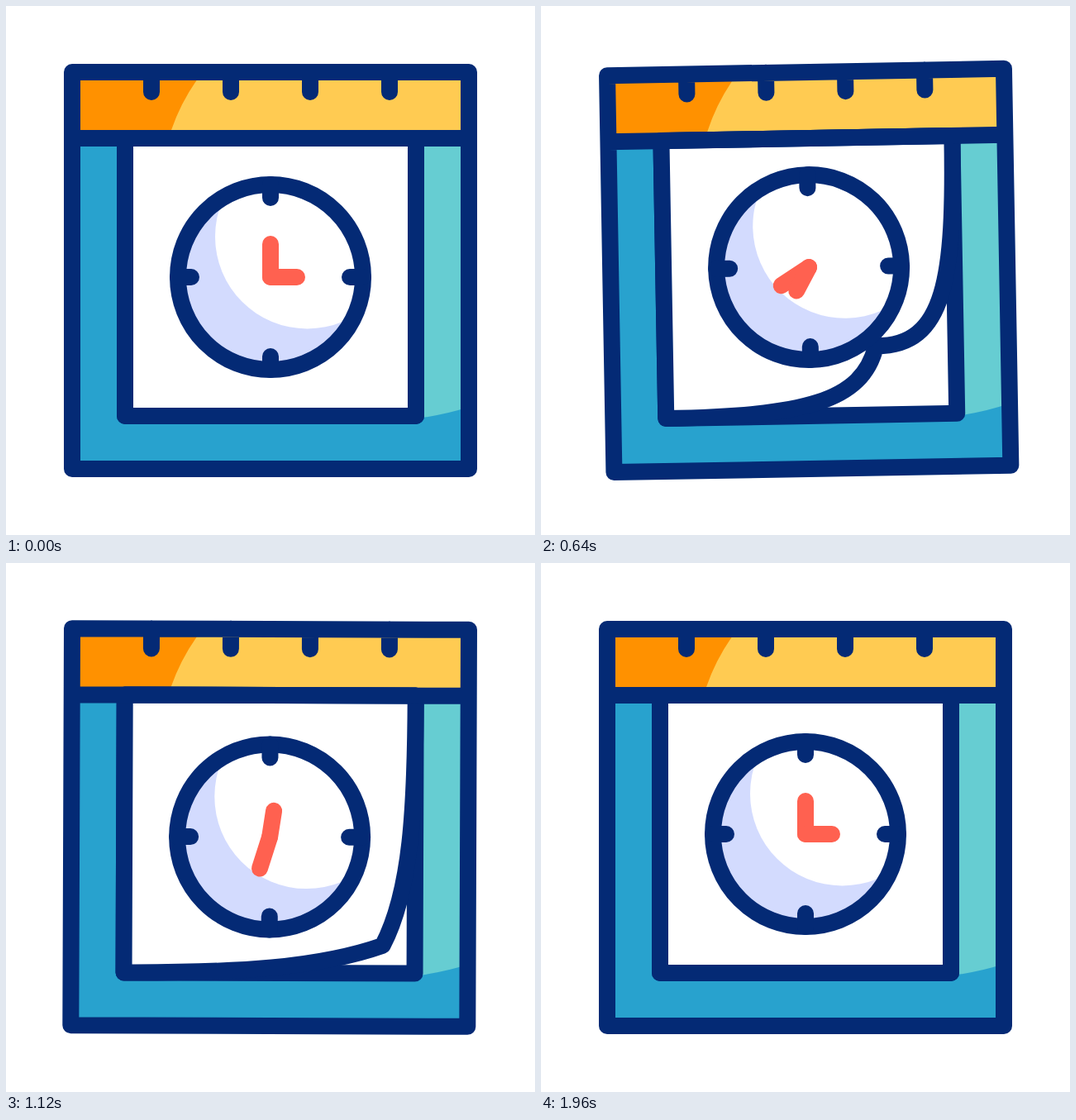
Recreate the animation shown at these times as an HTML page. Size 640x640 px, loop 2 s.

```html
<!DOCTYPE html>
<html lang="en">
<head>
<meta charset="utf-8">
<title>Calendar clock</title>
<style>
  html, body { margin: 0; width: 100%; height: 100%; overflow: hidden; background: #fff; }
  svg { display: block; width: 100%; height: 100%; }
  .line { stroke: #042a75; stroke-width: 20; stroke-linecap: round; stroke-linejoin: round; }
  .hand { stroke: #ff6150; stroke-width: 20; stroke-linecap: round; }
</style>
</head>
<body>
<svg viewBox="0 0 640 640" fill="none">
  <clipPath id="dial"><circle cx="320" cy="328" r="112"/></clipPath>
  <g id="calendar">
    <path fill="#28a2ce" d="M80 80H560V560H80Z"/>
    <path fill="#66cdd2" d="M490 160H560V485Q530 495 490 500Z"/>
    <path fill="#ffcb52" d="M80 80H560V160H80Z"/>
    <path fill="#ff9100" d="M80 80H236L230.500 90Q211 118 200 150L197 160H80Z"/>
    <path class="line" fill="#fff" d="M144 160H496V496H144Z"/>
    <path class="line" fill="#fff" id="page"/>
    <path class="line" d="M80 80H560V560H80ZM80 160H560M176 80v24M272 80v24M368 80v24M464 80v24"/>
    <g id="clock">
      <g clip-path="url(#dial)">
        <circle cx="320" cy="328" r="112" fill="#d3dbfe"/>
        <circle cx="364.5" cy="279" r="111.5" fill="#fff"/>
      </g>
      <circle class="line" cx="320" cy="328" r="112"/>
      <path class="line" d="M320 216v16M320 440v-16M208 328h16M432 328h-16"/>
      <path class="hand" id="minute" d="M320 328v-40"/>
      <path class="hand" id="hour" d="M320 328h32"/>
    </g>
  </g>
</svg>
<script>
const LOOP = 2000, STEP = 40;
const swing = [[20, 0], [440, -5], [840, 3], [1280, -1], [1310, -1], [1760, 0]];
const bounce = [[400, 0], [760, -16], [1160, 4], [1440, 0]];

const el = id => document.getElementById(id);
const lerp = (a, b, p) => a + (b - a) * p;
const ease = (t, from, to) => {
  const p = Math.min(1, Math.max(0, (t - from) / (to - from)));
  return p * p * (3 - 2 * p);
};
const keyed = (t, keys) => keys.slice(1).reduce(
  (v, [time, value], i) => v + (value - keys[i][1]) * ease(t, keys[i][0], time), keys[0][1]);

// The loose corner moves in while its handles turn from the edges into a cusp.
function pagePath(p) {
  const x = 496 - 100 * p, y = 496 - 86 * p;
  return `M144 160H496C496 ${lerp(272, 332, p)} ${x + 88 * p} ${y + lerp(-112, 6, p)} ${x} ${y}` +
    `C${x + lerp(-117, -14, p)} ${y + 70 * p} ${lerp(261, 312, p)} 496 144 496Z`;
}

function draw(t) {
  const turn = 360 * ease(t, 40, 1600);
  const curl = 1.05 * ease(t, 70, 640) * (1 - ease(t, 440, 1600));
  el("calendar").setAttribute("transform", `rotate(${keyed(t, swing)} 320 80)`);
  el("clock").setAttribute("transform", `translate(0 ${keyed(t, bounce)})`);
  el("hour").setAttribute("transform", `rotate(${turn} 320 328)`);
  el("minute").setAttribute("transform", `rotate(${turn * 2} 320 328)`);
  el("page").setAttribute("d", pagePath(curl));
}

let start;
function tick(now) {
  start ??= now;
  draw(Math.floor((now - start) % LOOP / STEP) * STEP);
  requestAnimationFrame(tick);
}
draw(0);
requestAnimationFrame(tick);
</script>
</body>
</html>
```
